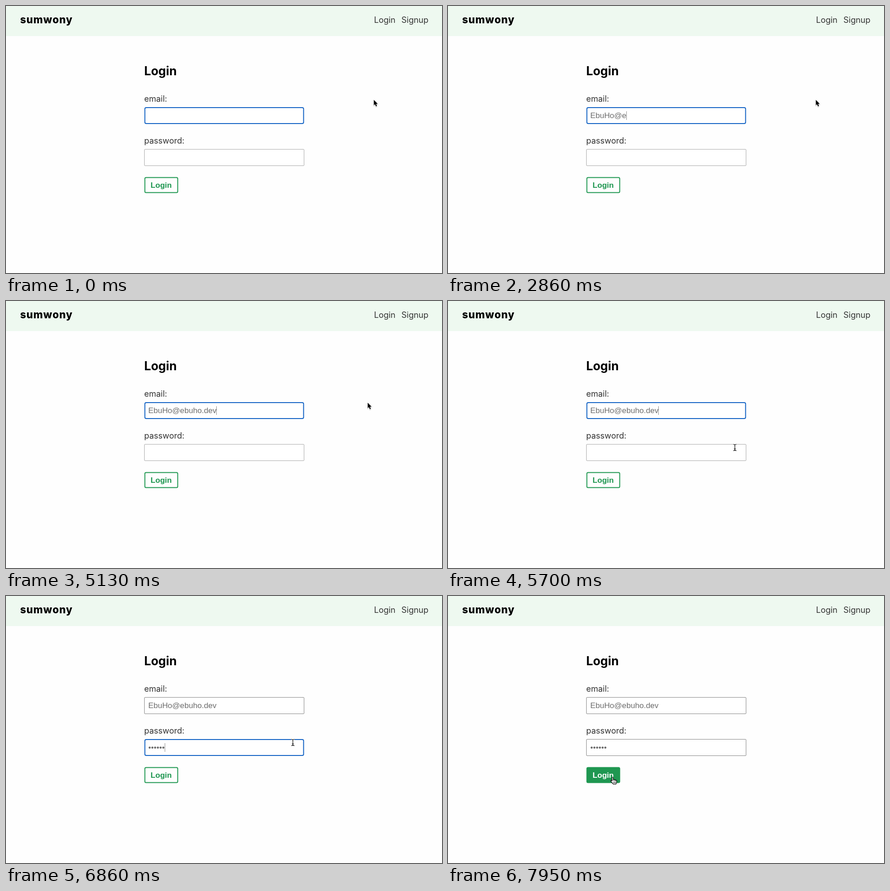
An HTML page that plays this animation: 956 by 586 pixels, repeating every 8000 ms.

```html
<!DOCTYPE html>
<html lang="en">
<head>
<meta charset="utf-8">
<title>Login form</title>
<style>
  html, body { margin: 0; width: 100%; height: 100%; overflow: hidden; background: #fefefe; }
  svg { display: block; }
  text { font-family: Inter, sans-serif; font-size: 18px; fill: #333; }
  .brand { font-size: 22.4px; font-weight: 800; letter-spacing: 1px; fill: #000; }
  .title { font-size: 26.4px; font-weight: 700; fill: #000; }
  .typed, .action { font-family: "Liberation Sans", Arial, sans-serif; font-size: 17.1px; fill: #6c6c6c; }
  .action { font-weight: 700; }
  .field { fill: #fff; }
</style>
</head>
<body>
<svg width="956" height="586" viewBox="0 0 956 586">
  <rect width="956" height="66" fill="#eef9f0"/>
  <text class="brand" x="31" y="38">sumwony</text>
  <text x="807" y="37">Login</text>
  <text x="867" y="37">Signup</text>
  <text class="title" x="303" y="152">Login</text>
  <text x="303" y="210">email:</text>
  <text x="303" y="302">password:</text>

  <rect class="field"/>
  <rect class="field"/>
  <text class="typed" x="312" y="246"></text>
  <text class="typed" x="312" y="338"></text>
  <rect id="caret" width="1" height="19" fill="#8c8c8c"/>

  <rect id="button" x="304.5" y="376.5" width="72" height="33" rx="2.5" stroke="#1f9751" stroke-width="2"/>
  <text id="action" class="action" x="317" y="399">Login</text>

  <defs>
    <path id="arrowShape" d="M.5 1V13L3.2 10.5 5.1 15.3 7.4 14.3 5.5 9.7H9.1Z"/>
    <path id="beamShape" fill="none" d="M-3.5 -6.5Q0 -6.5 0 -4.5Q0 -6.5 3.5 -6.5M0 -4.5V5.5M-3.5 7.5Q0 7.5 0 5.5Q0 7.5 3.5 7.5M-2 3.5H2"/>
  </defs>
  <g id="pointer">
    <g id="arrow" stroke-linejoin="round">
      <use href="#arrowShape" y="1.5" opacity=".2" stroke="#000" stroke-width="1.5"/>
      <use href="#arrowShape" stroke="#fff" stroke-width="1.6" paint-order="stroke"/>
    </g>
    <g id="beam">
      <use href="#beamShape" stroke="#fff" stroke-width="2.6"/>
      <use href="#beamShape" stroke="#000" stroke-width="1.2"/>
    </g>
    <g id="hand" stroke="#000" stroke-linejoin="round" stroke-linecap="round">
      <path d="M-1.3 8V1Q-1.3 -.5 0 -.5T1.4 1V5Q3.5 4 4.2 5.6Q6 4.8 6.6 6.4Q8.8 5.8 8.8 8V11Q8.6 13 7.3 14.8H1Q-.5 12.4 -2.2 10.8L-4.2 8.3Q-4.6 6.6 -3 6.7Z" fill="#fff" stroke-width="1.2"/>
      <path d="M1.4 5V7.5M4.2 5.6V8M6.6 6.4V8.3M2 10V12.7M4.2 10V12.7M6.4 10V12.7" stroke-width=".9"/>
    </g>
  </g>
</svg>
<script>
const LOOP = 8000, BLINK = 490;
const FOCUS_EMAIL = 250, FOCUS_PASSWORD = 5860, SUBMIT = 7950;

// Each burst types its text at a steady pace
const bursts = [
  { field: 0, text: 'EbuHo', start: 970, step: 265 },
  { field: 0, text: '@ebuho', start: 2650, step: 210 },
  { field: 0, text: '.dev', start: 4000, step: 236 },
  { field: 1, text: '••••••', start: 5980, step: 164 }
];

// Pointer moves along cubic curves
const moves = [
  { start: 5110, end: 5700, curve: [[806, 205], [720, 311], [660, 470], [629, 321]] },
  { start: 7000, end: 7770, curve: [[629, 321], [540, 343], [455, 363], [361, 398]] }
];

const $ = id => document.getElementById(id);
const fields = document.querySelectorAll('.field');
const typed = document.querySelectorAll('.typed');
const fieldTop = [222, 314];

const set = (el, attrs) => { for (const k in attrs) el.setAttribute(k, attrs[k]); };
const show = (el, on) => set(el, { visibility: on ? 'visible' : 'hidden' });
const inside = (x, y, l, t, r, b) => x >= l && x <= r && y >= t && y <= b;
const clamp = u => Math.min(1, Math.max(0, u));
const easeOut = u => 1 - (1 - u) ** 1.5;

function pointerAt(t) {
  const { start, end, curve: [a, b, c, d] } = moves.findLast(m => t >= m.start) || moves[0];
  const u = easeOut(clamp((t - start) / (end - start))), v = 1 - u;
  return [0, 1].map(i => v ** 3 * a[i] + 3 * v * v * u * b[i] + 3 * v * u * u * c[i] + u ** 3 * d[i]);
}

// Fills both fields and returns the time of the latest key press
function type(t) {
  const values = ['', ''];
  let lastKey = 0;
  for (const { field, text, start, step } of bursts) {
    if (t < start) break;
    const count = Math.min(text.length, Math.floor((t - start) / step) + 1);
    values[field] += text.slice(0, count);
    lastKey = start + (count - 1) * step;
  }
  values.forEach((value, i) => { typed[i].textContent = value; });
  return lastKey;
}

function drawField(i, focused) {
  const line = focused ? 2 : 1, inset = focused ? 1.5 : 0.5;
  const idle = typed[i].textContent ? '#858585' : '#a9a9a9';
  set(fields[i], {
    x: 303 + inset, y: fieldTop[i] + line / 2,
    width: 351 - 2 * inset, height: 37 - line,
    rx: 1.5 * line,
    stroke: focused ? '#1262c4' : idle,
    'stroke-width': line
  });
}

function drawCaret(t, active, lastKey) {
  const since = Math.max(lastKey, active ? FOCUS_PASSWORD : FOCUS_EMAIL);
  const on = active >= 0 && Math.floor((t - since) / BLINK) % 2 === 0;
  show($('caret'), on);
  if (!on) return;
  const box = typed[active];
  const width = box.textContent ? box.getComputedTextLength() : 0;
  set($('caret'), { x: Math.round(312 + width), y: fieldTop[active] + 9 });
}

function drawPointer(t) {
  const [x, y] = pointerAt(t);
  const hover = inside(x, y, 303, 376, 377, 410);
  const overField = fieldTop.some(top => inside(x, y, 303, top, 654, top + 37));
  set($('pointer'), { transform: `translate(${x} ${y})` });
  show($('hand'), hover);
  show($('beam'), overField);
  show($('arrow'), !hover && !overField);
  set($('button'), { fill: hover ? '#1f9751' : '#fefefe' });
  $('action').style.fill = hover ? '#fff' : '#1f9751';
}

function draw(t) {
  const lastKey = type(t);
  const active = t < FOCUS_PASSWORD ? 0 : t < SUBMIT ? 1 : -1;
  fields.forEach((_, i) => drawField(i, i === active));
  drawCaret(t, active, lastKey);
  drawPointer(t);
}

const start = performance.now();
function tick() {
  draw((performance.now() - start) % LOOP);
  requestAnimationFrame(tick);
}
tick();
</script>
</body>
</html>
```
